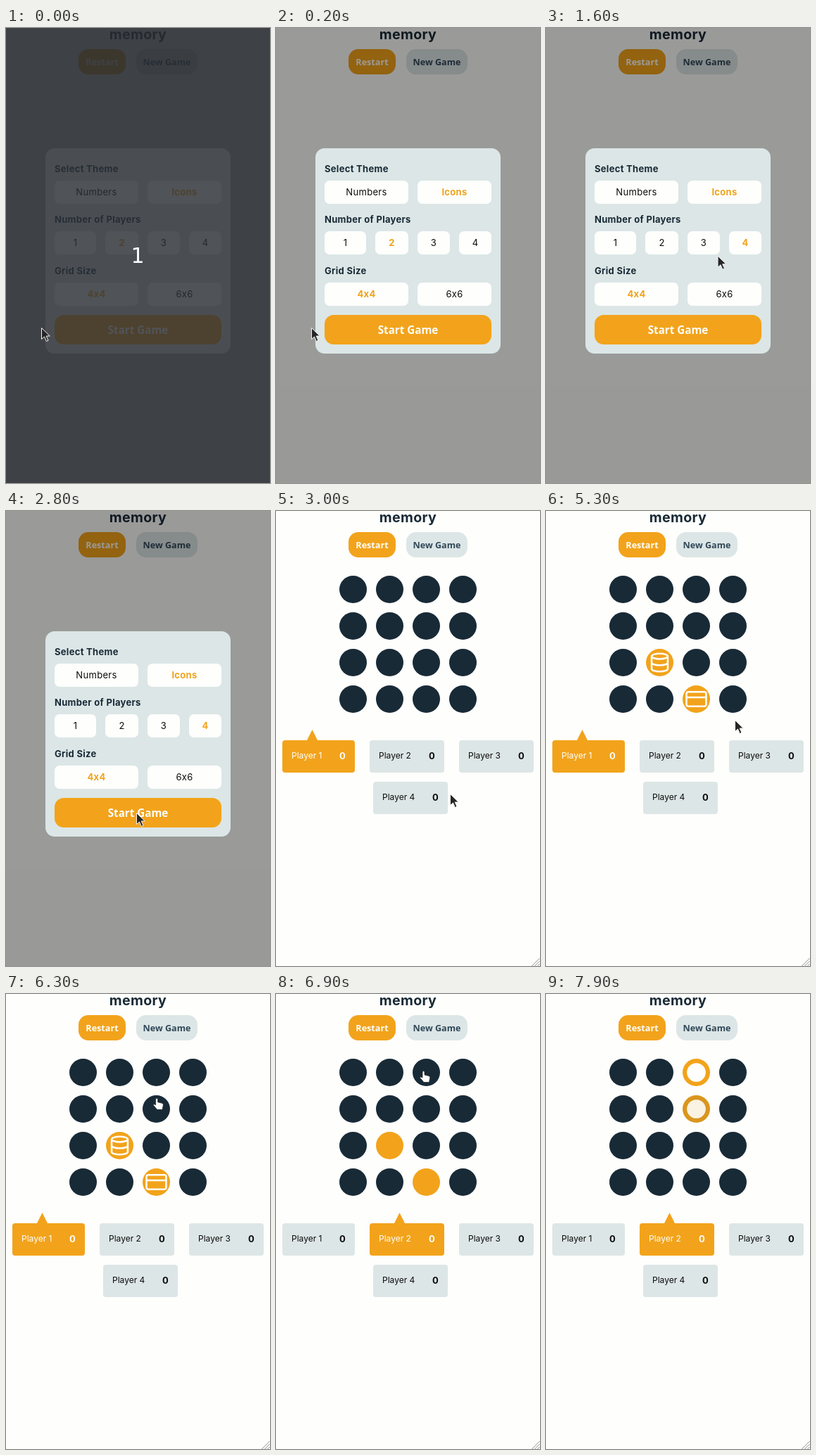
Recreate the animation shown at these times as an HTML page. Size 375 by 647 pixels, loop 8000 ms.

```html
<!DOCTYPE html>
<html lang="en">
<head>
<meta charset="utf-8">
<title>Memory game</title>
<style>
html, body { margin: 0; width: 100%; height: 100%; overflow: hidden; background: #fefefc; }
svg { display: block; width: 375px; height: 647px; }
text { font: 13px Inter, sans-serif; fill: #0c0c0c; letter-spacing: .3px; }
.bold { font-weight: 700; }
.head { font-weight: 700; fill: #182a36; }
.title { font-size: 19.6px; }
.chosen { font-weight: 700; fill: #efa31b; }
.name { font-size: 12px; letter-spacing: 0; }
.button { font: 700 12.6px "Noto Sans", sans-serif; letter-spacing: 0; }
.start { font: 600 15.2px "Noto Sans", sans-serif; letter-spacing: 0; fill: #fefefc; }
.count { font: 30px "DejaVu Sans", sans-serif; letter-spacing: 0; fill: #fff; }
.line { fill: none; stroke: #fefefc; stroke-width: 2; stroke-linecap: round; stroke-linejoin: round; }
</style>
</head>
<body>
<svg id="stage" viewBox="0 0 375 647"></svg>
<script>
const LOOP = 8000, TICK = 100, FADE = 300;
const PICK_FOUR = 1200, START = 2800, NEXT_TURN = 6900;
const WHITE = '#fefefc', ORANGE = '#f2a31b', PALE = '#dde6e6', SLATE = '#304859';
const DARK_RGB = [24, 42, 54], ORANGE_RGB = [242, 163, 27];
const stage = document.getElementById('stage');

function add(parent, tag, attrs = {}, content = '') {
  const node = document.createElementNS('http://www.w3.org/2000/svg', tag);
  for (const key in attrs) node.setAttribute(key, attrs[key]);
  node.textContent = content;
  parent.append(node);
  return node;
}
const group = parent => add(parent, 'g');
const box = (parent, x, y, width, height, rx, fill) =>
  add(parent, 'rect', { x, y, width, height, rx, fill });
const cover = (parent, fill) => box(parent, 0, 0, 375, 647, 0, fill);
const label = (parent, content, x, y, cls, anchor = 'middle') =>
  add(parent, 'text', { x, y, class: cls, 'text-anchor': anchor }, content);
const show = (node, on) => { node.style.display = on ? '' : 'none'; };

// Header
function pill(content, x, w, fill, ink) {
  box(stage, x, 30, w, 36, 14, fill);
  label(stage, content, x + w / 2, 53, 'button').style.fill = ink;
}
cover(stage, WHITE);
label(stage, 'memory', 187.5, 16, 'head title');
pill('Restart', 103, 67, ORANGE, WHITE);
pill('New Game', 185, 87, PALE, SLATE);

// Board
const board = group(stage);
const cards = Array.from({ length: 16 }, (_, i) => {
  const x = 109.5 + 52 * (i % 4), y = 111.5 + 52 * Math.floor(i / 4);
  const disc = add(board, 'circle', { cx: x, cy: y, r: 19.5 });
  const icon = add(board, 'g', { transform: `translate(${x} ${y}) scale(1.27) translate(-12 -12)` });
  return { x, y, disc, icon, open: Infinity, close: Infinity };
});
function flip(index, open, close, tag, attrs) {
  Object.assign(cards[index], { open, close });
  add(cards[index].icon, tag, attrs);
}
flip(14, 4200, NEXT_TURN, 'path', {
  class: 'line', d: 'M3 4H21a2 2 0 0 1 2 2V18a2 2 0 0 1-2 2H3a2 2 0 0 1-2-2V6a2 2 0 0 1 2-2zM1 10H23' });
flip(9, 4700, NEXT_TURN, 'path', {
  class: 'line', d: 'M3 5a9 3 0 0 1 18 0a9 3 0 0 1-18 0V19c0 1.66 4 3 9 3s9-1.34 9-3V5M3 12c0 1.66 4 3 9 3s9-1.34 9-3' });
flip(2, 7100, Infinity, 'circle', { cx: 12, cy: 12, r: 10.5, fill: WHITE });
flip(6, 7700, Infinity, 'circle', { cx: 12, cy: 12, r: 10.5, fill: WHITE });

// Players
const players = [9, 133, 260, 138].map((x, i) => {
  const y = i < 3 ? 326 : 385, w = i ? 106 : 103;
  const pointer = add(board, 'path', { d: `M${x + 35} ${y}l7.5-15l7.5 15z`, fill: ORANGE });
  const plate = box(board, x, y, w, 46, 4, PALE);
  const texts = [
    label(board, `Player ${i + 1}`, x + 13, y + 26, 'name', 'start'),
    label(board, '0', x + w - 13, y + 27, 'bold', 'end')
  ];
  return { pointer, plate, texts };
});

// Resize grip
add(board, 'path', { d: 'M363.5 647l11-11M367.5 647l7-7M371.5 647l3-3', stroke: '#8a8a8a', fill: 'none' });

// Setup dialog: each row of options is split at the given column edges
const dialog = group(stage);
const GAP = 13, buttons = [];
cover(dialog, 'rgba(0,0,0,.395)');
box(dialog, 56, 171, 263, 292, 13, '#dce6e6');

function button(x, y, w, h, r, fill) {
  box(dialog, x, y, w, h, r, fill);
  buttons.push({ x, y, w, h });
}
function optionRow(title, y, edges, names) {
  label(dialog, title, 69, y - 12, 'head', 'start');
  return names.map((name, i) => {
    const x = edges[i], w = edges[i + 1] - x - GAP;
    button(x, y, w, 33, 7, WHITE);
    return label(dialog, name, x + w / 2, y + 21, '');
  });
}
const halves = [69, 201, 319], quarters = [69, 141, 201, 260, 319];
const themes = optionRow('Select Theme', 217, halves, ['Numbers', 'Icons']);
const counts = optionRow('Number of Players', 289, quarters, [1, 2, 3, 4]);
const sizes = optionRow('Grid Size', 362, halves, ['4x4', '6x6']);
const choose = (row, pick) =>
  row.forEach((node, i) => node.setAttribute('class', i === pick ? 'chosen' : ''));
choose(themes, 1);
choose(sizes, 0);
button(69, 408, 237, 42, 13, ORANGE);
label(dialog, 'Start Game', 187.5, 434.5, 'start');

// Countdown
const countdown = group(stage);
cover(countdown, 'rgba(42,46,52,.82)');
label(countdown, '1', 187, 334, 'count');

// Mouse
const cursor = group(stage);
const arrow = add(cursor, 'path', {
  d: 'M.5 .5V16.5L4.5 13L7.3 19.5L10 18.3L7.2 12H12.3Z', fill: '#262626', stroke: '#f4f4f4' });
const hand = add(cursor, 'path', {
  d: 'M-1 2Q-1 .5 .5 .5T2 2V6L8 7.5Q10 8 9.8 10L8.5 16.5H1L-4.5 10Q-4 8-1 10Z',
  fill: '#fff', stroke: '#222', 'stroke-width': .7 });

// Leaves at, arrives at, destination, sideways bow of the path
const glide = (leave, arrive, x, y, bow = 0) => ({ leave, arrive, x, y, bow });
const home = { x: 50, y: 426 };
const glides = [
  glide(200, 400, 232, 333),
  glide(500, 800, 283, 309),
  glide(1300, 2200, 177, 413, .3),
  glide(2200, 2600, 185, 429),
  glide(2800, 3000, 247, 402),
  glide(3000, 3600, 200, 333),
  glide(3600, 4100, 203, 262, -1),
  glide(4200, 4600, 162, 216),
  glide(4700, 5300, 268, 297, 2),
  glide(5400, 5600, 101, 213),
  glide(5800, 6100, 207, 152),
  glide(6200, 6700, 209, 109, .8),
  glide(7500, 7700, 212, 171)
];

const clamp = p => Math.max(0, Math.min(1, p));
const smooth = p => p * p * (3 - 2 * p);

function mouseAt(t) {
  let { x, y } = home;
  for (const { leave, arrive, x: toX, y: toY, bow } of glides) {
    if (t <= leave) break;
    const p = smooth(clamp((t - leave) / (arrive - leave)));
    const dx = toX - x, dy = toY - y, side = 2 * p * (1 - p) * bow;
    x += dx * p - dy * side;
    y += dy * p + dx * side;
  }
  return { x, y };
}

function overTarget({ x, y }, t) {
  if (t < START) return buttons.some(b => x > b.x && x < b.x + b.w && y > b.y && y < b.y + b.h);
  return t > START + TICK && cards.some(c => Math.hypot(x - c.x, y - c.y) < 20);
}

function drawMouse(t) {
  const mouse = mouseAt(t), over = overTarget(mouse, t);
  cursor.setAttribute('transform', `translate(${mouse.x} ${mouse.y})`);
  show(arrow, !over);
  show(hand, over);
  show(cursor, t < 7900);
}

const fade = (t, start) => 1 - (1 - clamp((t - start) / FADE)) ** 2;

function render(t) {
  show(countdown, t < 200);
  show(dialog, t <= START);
  show(board, t > START);
  choose(counts, t < PICK_FOUR ? 1 : 3);

  for (const { disc, icon, open, close } of cards) {
    const lit = fade(t, open) * (1 - fade(t, close));
    const rgb = DARK_RGB.map((c, i) => Math.round(c + (ORANGE_RGB[i] - c) * lit));
    disc.setAttribute('fill', `rgb(${rgb})`);
    icon.setAttribute('opacity', t < close ? lit : 0);
  }

  const turn = t < NEXT_TURN ? 0 : 1;
  players.forEach(({ pointer, plate, texts }, i) => {
    show(pointer, i === turn);
    plate.setAttribute('fill', i === turn ? ORANGE : PALE);
    for (const node of texts) node.style.fill = i === turn ? WHITE : '';
  });
  drawMouse(t);
}

const origin = performance.now();
function frame() {
  const t = (performance.now() - origin) % LOOP;
  render(Math.floor(t / TICK) * TICK);
  requestAnimationFrame(frame);
}
frame();
</script>
</body>
</html>
```
